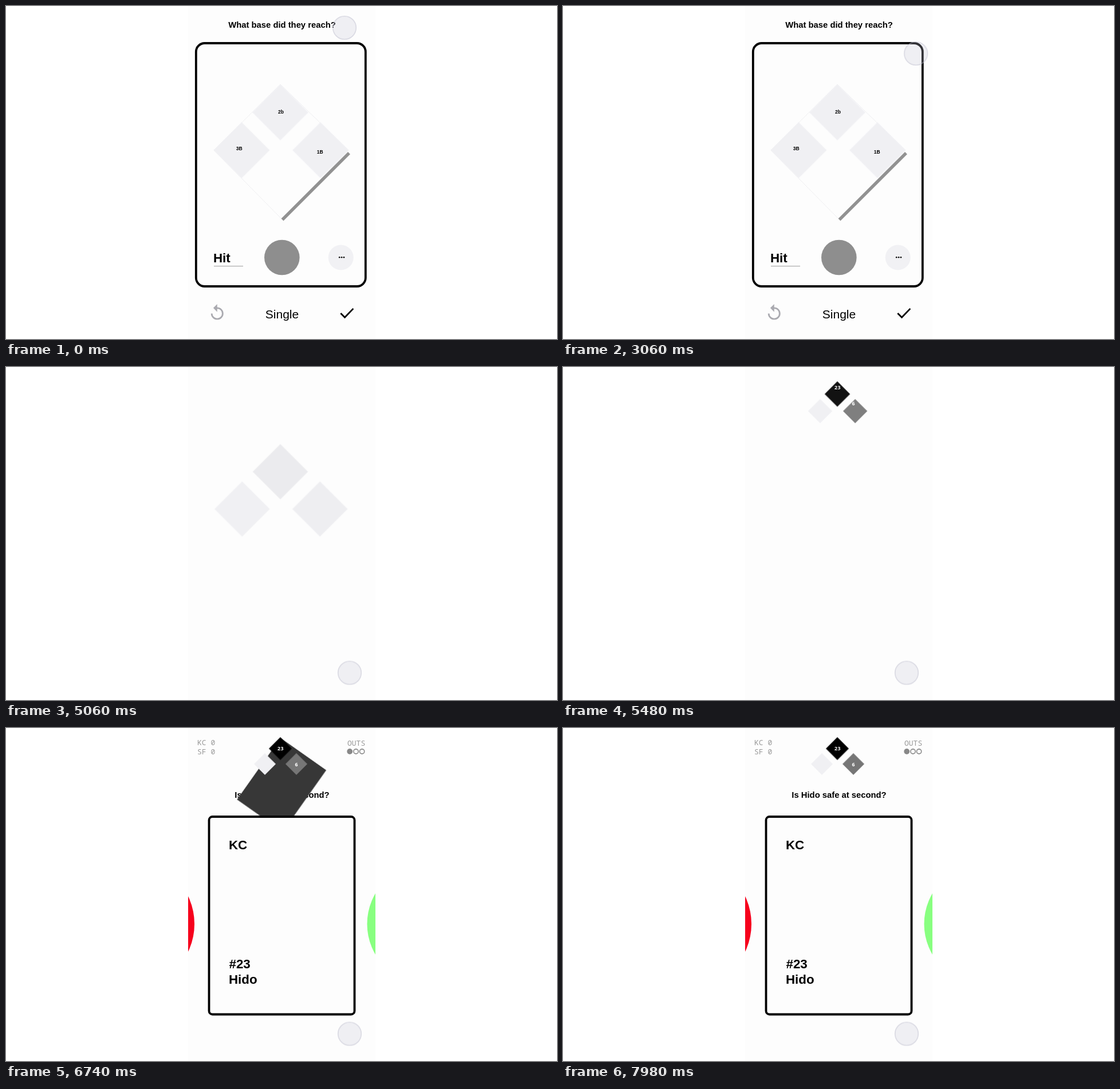
These frames come from a looping animation (962x582 px, 8000 ms). An HTML page:

```html
<!DOCTYPE html>
<html lang="en">
<head>
<meta charset="utf-8">
<title>Scorekeeper</title>
<style>
  html, body { margin: 0; width: 100%; height: 100%; overflow: hidden; background: #fff; }
  svg { display: block; width: 100vw; height: 100vh; }
  text { font-family: "Liberation Sans", Arial, sans-serif; font-weight: 700; }
  .mid { text-anchor: middle; }
  .title { font-size: 14.8px; text-anchor: middle; }
  .big { font-size: 22.3px; }
  .label { font-size: 8.5px; text-anchor: middle; }
  .mono { font: 500 13px "Noto Sans Mono", "DejaVu Sans Mono", monospace; fill: #999; }
  .num { font: 600 9.2px "Noto Sans Mono", "DejaVu Sans Mono", monospace; fill: #fff; text-anchor: middle; }

  .field, .game, .numbers, .base, .morph, .finger { animation: 8s linear infinite; }
  .field { animation-name: leave; }
  .game { animation-name: enter; }
  .numbers { animation-name: numbers; }
  .finger { animation-name: finger; fill: rgba(200,200,215,.25); stroke: rgba(190,190,205,.5); stroke-width: 1.6; }
  .morph { animation-name: morph; }

  .base { animation-name: fly; }
  .first { --from: translate(549px,252px); --to: translate(507px,63px); --size: .388; --ink: #767676; }
  .second { --from: translate(479px,186px); --to: translate(479px,36px); --size: .41; --ink: #000; }
  .third { --from: translate(411.5px,252px); --to: translate(452px,63px); --size: .388; --ink: #f0f0f3; }

  @keyframes leave {
    0%, 54.4% { opacity: 1; }
    59.4%, 100% { opacity: 0; }
  }
  @keyframes enter {
    0%, 83.74% { visibility: hidden; }
    83.75%, 100% { visibility: visible; }
  }
  @keyframes numbers {
    0%, 66% { opacity: 0; }
    67.5%, 100% { opacity: 1; }
  }
  @keyframes fly {
    0%, 62% {
      transform: var(--from) rotate(45deg) scale(1); fill: #f0f0f3;
      animation-timing-function: cubic-bezier(.65,0,.35,1);
    }
    70.75%, 100% { transform: var(--to) rotate(45deg) scale(var(--size)); fill: var(--ink); }
  }
  /* The second base swells, then unfolds into the player card. */
  @keyframes morph {
    0%, 73.24% { visibility: hidden; }
    73.25% {
      visibility: visible; fill: #000;
      transform: translate(479px,36px) rotate(45deg) scale(28,28);
      animation-timing-function: cubic-bezier(.333,0,.667,1);
    }
    81.25% {
      visibility: visible; fill: #000;
      transform: translate(482px,36px) rotate(45deg) scale(47,61);
      animation-timing-function: cubic-bezier(.333,0,.667,1);
    }
    91.25% {
      visibility: visible; fill: #fdfdfd;
      transform: translate(478.5px,327px) rotate(0deg) scale(280,386);
    }
    91.26%, 100% { visibility: hidden; }
  }
  @keyframes finger {
    0% { transform: translate(591px,38px); }
    10% { transform: translate(590px,39px); }
    20% { transform: translate(590px,41px); }
    28.25%, 29.5% { transform: translate(593px,48px); }
    32% { transform: translate(603px,54px); }
    41.5% { transform: translate(623px,98px); animation-timing-function: ease-in-out; }
    51%, 100% { transform: translate(600px,534.5px); }
  }
</style>
</head>
<body>
<svg viewBox="0 0 962 582" preserveAspectRatio="none">
  <defs>
    <clipPath id="phone"><path d="M318 0H645V582H318z"/></clipPath>
  </defs>
  <path d="M318 0H645V582H318z" fill="#fdfdfd"/>

  <g class="game">
    <g clip-path="url(#phone)">
      <circle cx="216.6" cy="342.5" r="112.4" fill="#f6001c"/>
      <circle cx="736.5" cy="342.5" r="106" fill="#88ff80"/>
    </g>
    <text class="mono" x="334" y="30">KC 0</text>
    <text class="mono" x="334" y="46">SF 0</text>
    <text class="mono" x="596" y="30.5">OUTS</text>
    <circle cx="600.2" cy="41" r="4.9" fill="#888"/>
    <g fill="none" stroke="#888" stroke-width="1.6">
      <circle cx="611" cy="41" r="4.1"/>
      <circle cx="621.6" cy="41" r="4.1"/>
    </g>
    <text class="title" x="482" y="122">Is Hido safe at second?</text>
  </g>

  <rect class="morph" x="-.5" y="-.5" width="1" height="1"/>

  <g class="game">
    <rect x="354.5" y="155" width="254" height="345.5" rx="6" fill="#fdfdfd" stroke="#000" stroke-width="3.8"/>
    <text class="big" x="389" y="212">KC</text>
    <text class="big" x="389.5" y="420">#23</text>
    <text class="big" x="389" y="447">Hido</text>
  </g>

  <g class="field">
    <text class="title" x="482" y="38">What base did they reach?</text>
    <rect x="331.8" y="65" width="296" height="425" rx="15" fill="#fdfdfd" stroke="#000" stroke-width="3.8"/>
    <path d="M363 252L479 137L598 252L482 373z" fill="none" stroke="#e9e9ec" stroke-dasharray="2 1"/>
  </g>

  <rect class="base third" x="-34.5" y="-34.5" width="69" height="69"/>
  <rect class="base first" x="-34.5" y="-34.5" width="69" height="69"/>
  <rect class="base second" x="-34.5" y="-34.5" width="69" height="69"/>
  <g class="numbers">
    <text class="num" x="479.3" y="39">23</text>
    <text class="num" x="507" y="66.5">6</text>
  </g>

  <g class="field">
    <path d="M482.5 373.5L599 257" stroke="#929292" stroke-width="5.5"/>
    <text class="label" x="480" y="188">2b</text>
    <text class="label" x="407.3" y="251.7">3B</text>
    <text class="label" x="548.3" y="257.5">1B</text>
    <text class="big" x="362" y="447.5">Hit</text>
    <path d="M363 454.7H414" stroke="#999"/>
    <circle cx="481.8" cy="439.5" r="30.8" fill="#8e8e8e"/>
    <circle cx="584.7" cy="439.5" r="22" fill="#f1f1f4"/>
    <g>
      <circle cx="582.2" cy="439.2" r="1.3"/>
      <circle cx="586.1" cy="439.2" r="1.3"/>
      <circle cx="590" cy="439.2" r="1.3"/>
    </g>
    <path transform="translate(352.3 519.6) scale(1.37)" fill="#aaaab0"
      d="M12 5V1L7 6l5 5V7a6 6 0 1 1-6 6H4a8 8 0 1 0 8-8z"/>
    <text class="mid" x="482" y="545.7" style="font-size:21px;font-weight:400">Single</text>
    <path d="M584.3 537L591.5 544.2L606.3 528.9" fill="none" stroke="#000" stroke-width="2.8"/>
  </g>

  <circle class="finger" r="20.3"/>
</svg>
</body>
</html>
```
